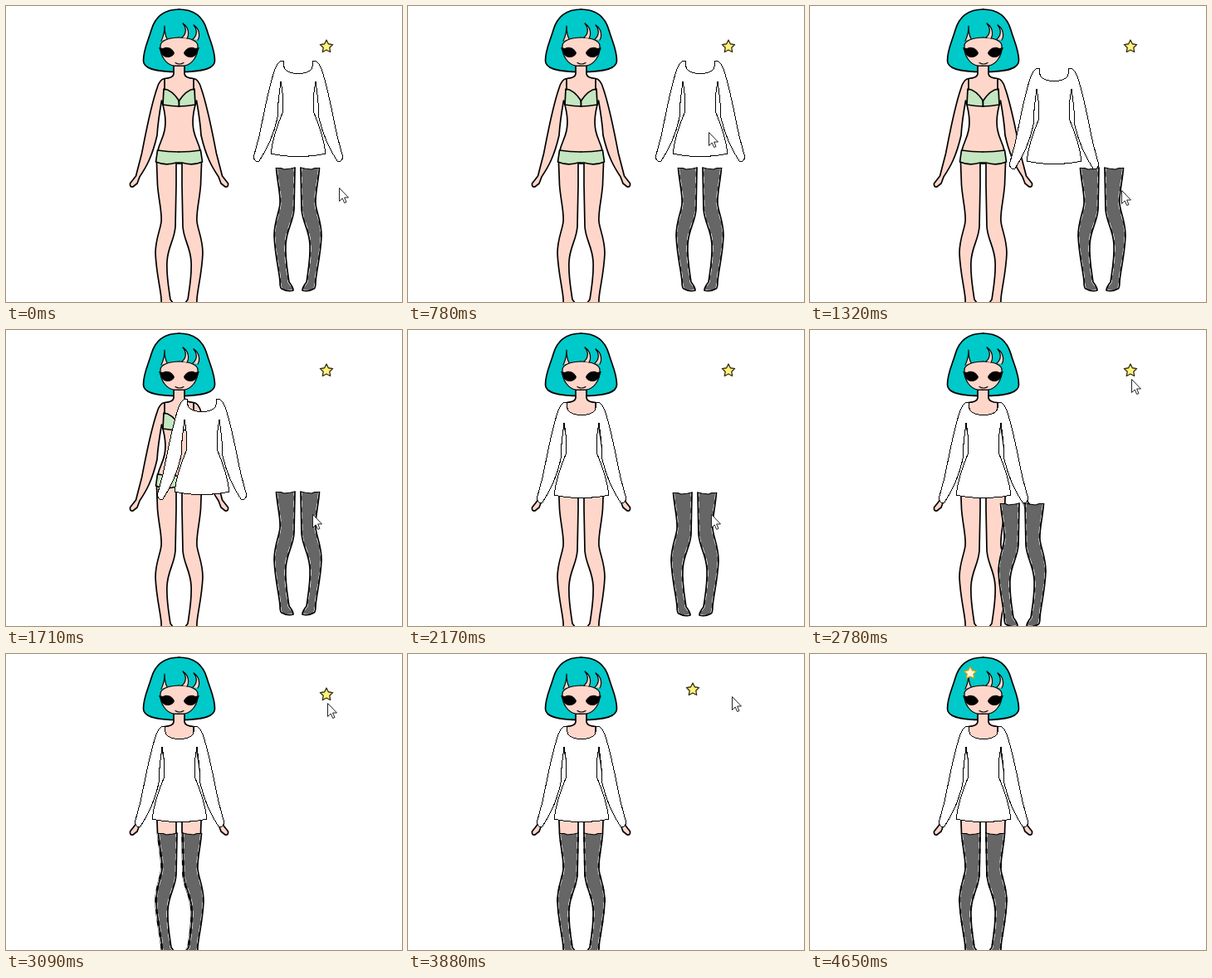
Recreate the animation shown at these times as an HTML page. Size 477 by 357 pixels, loop 5.11 s.

```html
<!DOCTYPE html>
<html lang="en">
<head>
<meta charset="utf-8">
<title>Paper doll</title>
<style>
  html, body { margin: 0; width: 100%; height: 100%; overflow: hidden; background: #fff; }
  svg { display: block; width: 477px; height: 357px; }
  .line { fill: none; stroke: #000; stroke-width: 1.7; stroke-linejoin: round; stroke-linecap: round; }
  .thin { stroke-width: 1.2; }
  .skin { fill: #ffd6ca; }
  .cloth { fill: #c4e6c0; }
  .hair { fill: #00c9c9; }
</style>
</head>
<body>
<svg viewBox="0 0 477 357">
  <g id="doll"></g>
  <g id="socks"></g>
  <g id="shirt"></g>
  <path id="star" stroke-width="1.3" stroke-linejoin="round"/>
  <path id="cursor" fill="#fff" stroke="#222" d="M.5,.5 V16.5 L4.2,13 L6.7,18.5 L9,17.5 L6.6,12 H11.5Z"/>
</svg>
<script>
const LOOP = 5110, STEP = 77.5, LAST = 60;
const $ = id => document.getElementById(id);
const path = (cls, d) => `<path class="${cls}" d="${d}"/>`;

// Shapes are drawn as left halves and reflected about x = axis.
const mirrored = (s, axis = 208.5) =>
  s + `<g transform="translate(${2 * axis} 0) scale(-1 1)">${s}</g>`;

const leg = 'C184,235 188,248 187,260 C186,270 180,281 180,298 C181,322 186,340 187,353 ' +
  'Q187,361 189,362 Q196,366 203,364 Q203,360 198,354 C196,340 193,325 194,308 ' +
  'C195,290 203,282 204,266 L205,216';
const body = 'M209,72 H202 V82 Q201,87 191,87.5 C187,88 184,92 182,99 C174,122 169,150 163.5,178 ' +
  'L156.5,205 L149.5,214 Q149,219 153,218 L158,214 L161,206 C169,194 176,182 182,156 ' +
  'C183,140 185,128 187.5,114 C190,122 194,135 191,150 C189,160 185,165 183,174 L181.5,190 L182.5,216 ' +
  leg + ' V190 H209';

$('doll').innerHTML =
  mirrored(path('line hair', 'M209,4 C188,4 179,15 175,29 C171,43 165.5,52 165.5,66 C165.5,75 178,79.5 209,79.5')) +
  mirrored(path('line skin', body)) +
  mirrored(
    path('line cloth', 'M209,115 Q200,101 190,100 L189,119 Q200,121 209,121') +
    path('line', 'M191,88 V101 M208.5,115 V121') +
    path('line cloth', 'M209,176 Q195,176 182.5,174 L180.5,188 Q192,193 205,189 H209')) +
  mirrored(
    path('line thin skin', 'M209,38 C196,38 186,42 186,48 C185,61 194,71 202,72 H209') +
    path('', 'M184,50 L189,51 C194,48 201,51 203,57 C200,63.5 190,64 187,57Z')) +
  path('line thin', 'M204,68.5 Q209,71.5 214,68.5') +
  path('line thin skin', 'M187,42 C190,36 191,30 191,24 C191,31 192,36 194,39.5') +
  [[212, 38], [225, 40]].map(([x, y]) =>
    path('line thin skin', `M${x},${y} c5,-4 6,-11 1,-17 c7,4 8,13 5,18`)).join('');

const sock = `M182.5,216.5 ${leg}`;
$('socks').innerHTML = mirrored(
  `<path fill="#666" d="${sock} L200,217 L192,218 L188,216Z"/>
   <path fill="none" stroke="#fff" stroke-width="3" stroke-dasharray="8 6" d="${sock}"/>` +
  path('line', sock) + path('line thin', 'M182.5,216.5 H188 L192,218 L200,217 L205,216'));

$('shirt').innerHTML = mirrored(
  `<path fill="#fff" stroke="#000" shape-rendering="crispEdges" d="M210,102.5 C196,102.5 190,98 192,88
   C188,86 184,89 181,97 C173,120 168,150 162,178 L155,204 Q158,210 162,208 C170,196 178,182 184,156
   C184,140 186,128 188,112 C190,122 192,135 190,150 C186,160 179,175 176,199 Q192,203 210,202"/>`, 209);

const points = Array.from({ length: 10 }, (_, i) => {
  const a = (i / 5 - 0.5) * Math.PI, r = i % 2 ? 4 : 8;
  return [r * Math.cos(a), r * Math.sin(a)].map(v => v.toFixed(2));
});
$('star').setAttribute('d', `M${points.join('L')}Z`);

// Each part glides evenly from its place to the next: [from ms, to ms, x, y].
const parts = {
  shirt: { home: [143, -21], moves: [[925, 1890, 0, 0]] },
  socks: { home: [143, -21], moves: [[2130, 3110, 0, 0]] },
  star: { home: [386, 49], moves: [[3650, 4650, 193, 23]] },
  cursor: {
    home: [401, 219],
    moves: [[0, 305, 341, 41], [390, 1020, 375, 222], [1320, 1940, 365, 222],
      [2400, 2700, 387, 59], [3480, 3560, 390, 51], [3880, 4190, 402, 208], [4190, 4640, 432, 360]]
  }
};

function place({ home, moves }, t) {
  let [x, y] = home;
  for (const [from, to, nx, ny] of moves) {
    const k = Math.min(1, Math.max(0, (t - from) / (to - from)));
    x += (nx - x) * k;
    y += (ny - y) * k;
  }
  return [Math.round(x), Math.round(y)];
}

const start = performance.now();
function draw() {
  const now = (performance.now() - start) % LOOP;
  const frame = Math.min(LAST, Math.floor((now + 10) / STEP));
  for (const id in parts) {
    $(id).setAttribute('transform', `translate(${place(parts[id], frame * STEP)})`);
  }
  const worn = frame === LAST;
  $('star').setAttribute('fill', worn ? '#fffbe0' : '#fff27a');
  $('star').setAttribute('stroke', worn ? '#c9a010' : '#332c10');
  requestAnimationFrame(draw);
}
draw();
</script>
</body>
</html>
```
